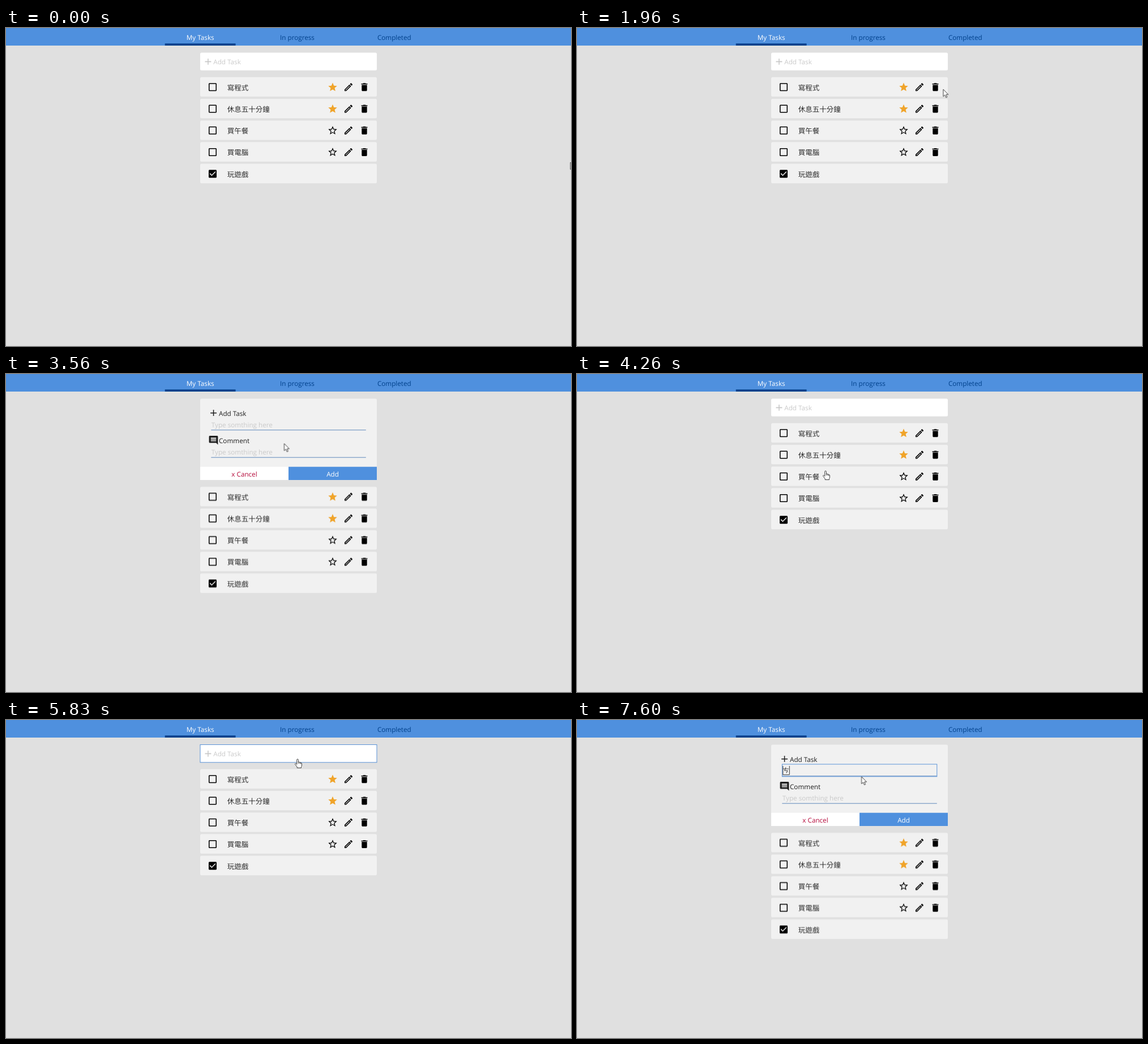
Animation, 998 px wide and 561 px high, one loop 8000 ms. Source, as an HTML page:

```html
<!DOCTYPE html>
<html lang="zh-TW">
<head>
<meta charset="utf-8">
<title>My Tasks</title>
<style>
  html, body { margin: 0; width: 100%; height: 100%; overflow: hidden; background: #e0e0e0; }
  svg { display: block; width: 100%; height: 100%; }
  text { font: 11.7px "Open Sans", "Noto Sans", sans-serif; text-rendering: geometricPrecision; }
  .mid { text-anchor: middle; }
  .cjk { font: 300 12.48px "Noto Sans CJK TC", "Noto Sans CJK", "Noto Sans CJK JP", sans-serif; fill: #2c2c2c; }
  .hint { fill: #cacaca; }
  .focus { fill: none; stroke: #5b93d8; }
  .pointer { fill: #fff; stroke: #2a2a2a; stroke-width: .9; stroke-linejoin: round; }

  .step { animation: 8s step-end infinite; }
  #form { animation-name: form; }
  #bar { animation-name: bar; }
  #rows { animation-name: rows; }
  #barFocus { animation-name: bar-focus; }
  #inputFocus { animation-name: input-focus; }
  #caret { animation-name: caret; }
  #typed { animation-name: typed; }
  #hint { animation-name: hint; }
  #arrow { animation-name: arrow; }
  #hand { animation-name: hand; }
  #beam { animation-name: beam; }
  #cursor { animation: move 8s linear infinite; }

  @keyframes form { 0%, 52.875% { opacity: 0 } 30.5%, 73.75%, 100% { opacity: 1 } }
  @keyframes bar { 0%, 52.875% { opacity: 1 } 30.5%, 73.75%, 100% { opacity: 0 } }
  @keyframes rows {
    0%, 52.875% { transform: translateY(0) }
    30.5%, 73.75%, 100% { transform: translateY(112.3px) }
  }
  @keyframes bar-focus { 0%, 30.5%, 73.75%, 100% { opacity: 0 } 29.5%, 71.9% { opacity: 1 } }
  @keyframes input-focus { 0% { opacity: 0 } 82.875%, 100% { opacity: 1 } }
  @keyframes caret { 0%, 89.1% { opacity: 0 } 82.875%, 94.95%, 100% { opacity: 1 } }
  @keyframes typed { 0% { opacity: 0 } 94.95%, 100% { opacity: 1 } }
  @keyframes hint { 0% { opacity: 1 } 94.95%, 100% { opacity: 0 } }

  @keyframes arrow {
    0%, 19.125%, 31.25%, 57%, 74.125%, 87.6%, 100% { opacity: 1 }
    .375%, 28.5%, 49.3%, 69.6%, 80.6% { opacity: 0 }
  }
  @keyframes hand {
    0%, 31.25%, 57%, 74.125%, 100% { opacity: 0 }
    28.5%, 49.3%, 69.6% { opacity: 1 }
  }
  @keyframes beam { 0%, 87.6%, 100% { opacity: 0 } 80.6% { opacity: 1 } }

  @keyframes move {
    0%, .375% { transform: translate(997.3px, 237px) }
    19.125% { transform: translate(990px, 236px) }
    21.25% { transform: translate(852px, 176px) }
    24.5% { transform: translate(647.3px, 108.3px); animation-timing-function: ease-out }
    29.125% { transform: translate(561px, 73px) }
    30.375%, 40.75% { transform: translate(554.3px, 68.4px); animation-timing-function: ease-in }
    44.5% { transform: translate(491.6px, 122.5px); animation-timing-function: ease-out }
    50.375%, 62% { transform: translate(439px, 171px); animation-timing-function: ease-in-out }
    71.5%, 79.125% { transform: translate(515px, 69px); animation-timing-function: ease-in-out }
    82%, 85.5% { transform: translate(505px, 87px) }
    89.1%, 100% { transform: translate(502.6px, 100px) }
  }
</style>
</head>
<body>
<svg viewBox="0 0 998 561">
  <defs>
    <path id="plus" d="M19 13h-6v6h-2v-6H5v-2h6V5h2v6h6v2z"/>
    <path id="box" d="M19 5v14H5V5h14m0-2H5c-1.1 0-2 .9-2 2v14c0 1.1.9 2 2 2h14c1.1 0 2-.9 2-2V5c0-1.1-.9-2-2-2z"/>
    <path id="checked" d="M19 3H5c-1.1 0-2 .9-2 2v14c0 1.1.9 2 2 2h14c1.1 0 2-.9 2-2V5c0-1.1-.9-2-2-2zm-9 14l-5-5 1.4-1.4L10 14.2l7.6-7.6L19 8l-9 9z"/>
    <path id="star" d="M12 17.27L18.18 21l-1.64-7.03L22 9.24l-7.19-.61L12 2 9.19 8.63 2 9.24l5.46 4.73L5.82 21z"/>
    <path id="hollow" d="M22 9.24l-7.19-.62L12 2 9.19 8.63 2 9.24l5.46 4.73L5.82 21 12 17.27 18.18 21l-1.63-7.03L22 9.24zM12 15.4l-3.76 2.27 1-4.28-3.32-2.88 4.38-.38L12 6.1l1.71 4.04 4.38.38-3.32 2.88 1 4.28L12 15.4z"/>
    <path id="pencil" d="M14.06 9.02l.92.92L5.92 19H5v-.92l9.06-9.06M17.66 3c-.25 0-.51.1-.7.29l-1.83 1.83 3.75 3.75 1.83-1.83c.39-.39.39-1.02 0-1.41l-2.34-2.34c-.2-.2-.45-.29-.71-.29zm-3.6 3.19L3 17.25V21h3.75L17.81 9.94l-3.75-3.75z"/>
    <path id="trash" d="M6 19c0 1.1.9 2 2 2h8c1.1 0 2-.9 2-2V7H6v12zM19 4h-3.5l-1-1h-5l-1 1H5v2h14V4z"/>
    <path id="comment" d="M22 4c0-1.1-.9-2-2-2H4c-1.1 0-2 .9-2 2v12c0 1.1.9 2 2 2h14l4 4V4zM18 14H6v-2h12v2zm0-3H6V9h12v2zm0-3H6V6h12v2z"/>
  </defs>

  <rect width="998" height="561" fill="#e0e0e0"/>
  <rect width="998" height="31" fill="#4f90de"/>
  <rect x="280.7" y="27.3" width="124.8" height="3.7" fill="#00408b"/>
  <g class="mid" fill="#00408b">
    <text x="343.2" y="20.7" fill="#fff">My Tasks</text>
    <text x="514.5" y="20.7">In progress</text>
    <text x="685.8" y="20.7">Completed</text>
  </g>

  <g id="bar" class="step">
    <rect x="343" y="43.5" width="312" height="31.3" rx="2.5" fill="#fff"/>
    <use href="#plus" transform="translate(347.6 50) scale(.78)" fill="#c8c8c8"/>
    <text class="hint" x="366.3" y="64.3">Add Task</text>
    <rect id="barFocus" class="step focus" x="343" y="43.5" width="312" height="31.3"/>
  </g>

  <g id="form" class="step">
    <path d="M343 187V46q0-2.5 2.5-2.5h307q2.5 0 2.5 2.5V187z" fill="#f1f1f1"/>
    <g fill="#1f1f1f">
      <use href="#plus" transform="translate(357.2 59.3) scale(.78)"/>
      <text x="376" y="73.6">Add Task</text>
      <use href="#comment" transform="translate(357 107.4) scale(.79)"/>
      <text x="376" y="122">Comment</text>
    </g>
    <text id="hint" class="step hint" x="362.8" y="93.5">Type somthing here</text>
    <text class="hint" x="362.8" y="142">Type somthing here</text>
    <path d="M362.3 98.8h273.5M362.3 147.2h273.5" stroke="#8fabcd" stroke-width="1.5"/>
    <rect id="inputFocus" class="step focus" x="362.4" y="78" width="273.4" height="21.8"/>
    <g id="typed" class="step">
      <text class="cjk" x="363.2" y="93.2" style="font-size:11.5px">ㄘ</text>
      <path d="M363.5 96.5h11.5" stroke="#333" stroke-width=".9"/>
      <path d="M375.3 81v15.5" stroke="#222" stroke-width=".9"/>
    </g>
    <path id="caret" class="step" d="M363.8 81v15.5" stroke="#222" stroke-width=".9"/>
    <rect x="343" y="163.7" width="156" height="23.3" fill="#fff"/>
    <rect x="499" y="163.7" width="156" height="23.3" fill="#4f90de"/>
    <text class="mid" x="421" y="180.6" fill="#b5093a">x Cancel</text>
    <text class="mid" x="577" y="180.6" fill="#fff">Add</text>
  </g>

  <g id="rows" class="step"></g>

  <g id="cursor">
    <path id="arrow" class="step pointer" d="M0 0V12.6L2.9 9.9 4.9 14.5 6.9 13.6 5 9.2H8.9z"/>
    <path id="hand" class="step pointer" d="M-1.3 9.5V1.2Q-1.3 0 0 0t1.3 1.2V5q2-.5 2.4.8 1.7-.5 2 .8 1.7-.2 1.7 1.4v3q0 1.5-1 2.7v1.8H-.8v-1.8L-4.2 9.4q-.8-1.3.3-1.7t1.5.7zM1.3 5v3M3.7 5.8v2.4M5.6 6.6v2"/>
    <path id="beam" class="step" d="M-2 -6.5h4M0 -6.5v13M-2 6.5h4" fill="none" stroke="#222" stroke-width=".9"/>
  </g>
</svg>
<script>
  const icon = (id, x, y, fill = '#000') =>
    `<use href="#${id}" transform="translate(${x - 9.36} ${y - 9.36}) scale(.78)" fill="${fill}"/>`;

  const tasks = [
    { name: '寫程式', starred: true },
    { name: '休息五十分鐘', starred: true },
    { name: '買午餐' },
    { name: '買電腦' },
    { name: '玩遊戲', done: true },
  ];

  document.getElementById('rows').innerHTML = tasks.map(({ name, starred, done }, i) => {
    const top = 86.7 + i * 38.22;
    const y = top + 17.6;
    const tools = done ? '' :
      (starred ? icon('star', 577, y, '#f0a42a') : icon('hollow', 577, y)) +
      icon('pencil', 605, y) + icon('trash', 633, y);
    return `<rect x="343" y="${top}" width="312" height="34.4" rx="2.5" fill="#f1f1f1"/>` +
      icon(done ? 'checked' : 'box', 365, y) +
      `<text class="cjk" x="390.8" y="${y + 5.4}">${name}</text>` + tools;
  }).join('');
</script>
</body>
</html>
```
